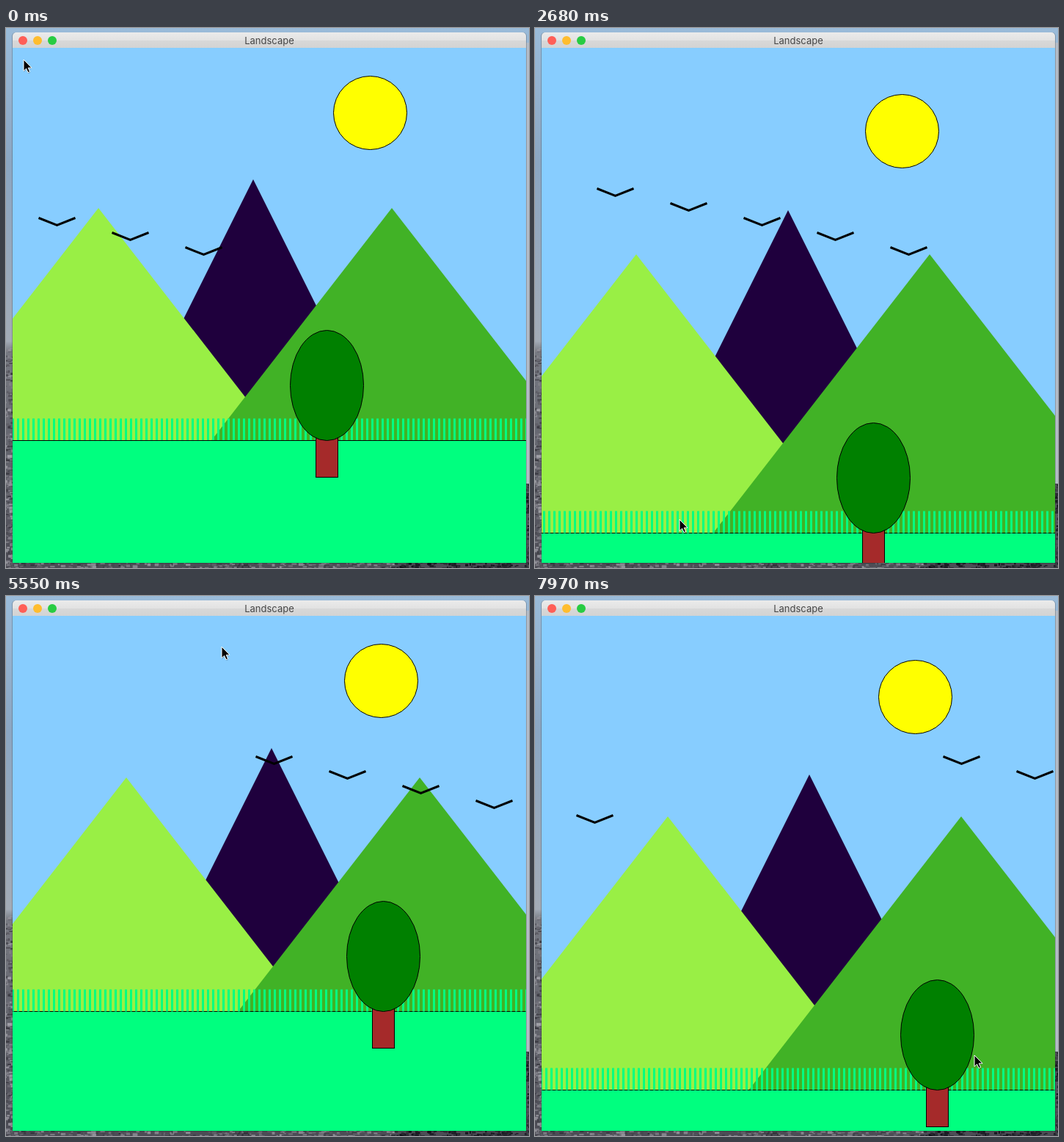
These frames come from a looping animation (713x735 px, 8 s). An HTML page:

```html
<!DOCTYPE html>
<html lang="en">
<head>
<meta charset="utf-8">
<title>Landscape</title>
<style>
  html, body { margin: 0; width: 100%; height: 100%; overflow: hidden; background: #9fbbd3; }
  svg { display: block; width: 100%; height: 100%; }
  .title { font: 13px Inter, "Liberation Sans", sans-serif; fill: #454545; text-anchor: middle; }
  .ink { stroke: #000; stroke-width: 1; }
</style>
</head>
<body>
<svg viewBox="0 0 713 735">
  <defs>
    <linearGradient id="air" x1="0" y1="0" x2="0" y2="1">
      <stop offset="0" stop-color="#9abbd9"/>
      <stop offset=".25" stop-color="#8ba6c2"/>
      <stop offset=".58" stop-color="#a3abb6"/>
      <stop offset=".6" stop-color="#777a82"/>
      <stop offset="1" stop-color="#4c4c55"/>
    </linearGradient>
    <linearGradient id="bar" x1="0" y1="0" x2="0" y2="1">
      <stop offset="0" stop-color="#ebebeb"/>
      <stop offset=".5" stop-color="#e2e2e2"/>
      <stop offset=".52" stop-color="#d8d8d8"/>
      <stop offset="1" stop-color="#d3d3d3"/>
    </linearGradient>
    <clipPath id="view"><rect x="9" y="27" width="700" height="701"/></clipPath>
  </defs>

  <rect width="713" height="735" fill="url(#air)"/>
  <rect x="709" y="20" width="4" height="600" fill="#b3bcc8"/>
  <g id="rock"></g>
  <rect x="8" y="6" width="702" height="723" rx="5" fill="#000" opacity=".2"/>
  <path d="M9 27V11a5 5 0 0 1 5-5H704a5 5 0 0 1 5 5V27Z" fill="url(#bar)"/>
  <circle cx="23" cy="17" r="6" fill="#ff5f57"/>
  <circle cx="43" cy="17" r="6" fill="#ffbd2e"/>
  <circle cx="63" cy="17" r="6" fill="#28cc42"/>
  <text class="title" x="359" y="22">Landscape</text>

  <g clip-path="url(#view)">
    <rect x="9" y="27" width="700" height="701" fill="#87cdff"/>
    <circle id="sun" class="ink" cx="496.5" cy="115.5" r="50" fill="#ff0"/>
    <path id="peak" d="M337 206l225 450h-450Z" fill="#1f003d"/>
    <g id="hills">
      <path d="M126 245l350 450h-700Z" fill="#99ef45"/>
      <path d="M526 245l350 450h-700Z" fill="#41b226"/>
    </g>
    <rect id="ground" class="ink" x="-10" y="561.5" width="740" height="300" fill="#00ff7f"/>
    <path id="grass" stroke="#00ff7f" stroke-width="3"/>
    <g id="tree" class="ink">
      <rect x="422.5" y="541.5" width="30" height="70" fill="#a52a2a"/>
      <ellipse cx="437.5" cy="486.5" rx="50" ry="75" fill="#008000"/>
    </g>
    <g id="birds" fill="none" stroke="#000" stroke-width="3"></g>
  </g>

  <g id="cursor">
    <path d="M0 1V17L4 13.5L6.5 19L9 18L6.5 12.5H11Z" fill="#000" opacity=".25"/>
    <path d="M0 0V15.5L3.6 12.2L6 17.6L8.6 16.5L6.2 11.2H11Z" fill="#000" stroke="#fff" stroke-width="1"/>
  </g>
</svg>
<script>
const LOOP = 8000, LEAD = 110, START = 1000;
const $ = id => document.getElementById(id);

// pointer path inside the window: time, x, y
const path = [
  [START, 15, 15], [1330, 21, 242], [1440, 48, 365], [1690, 78, 482],
  [2100, 98, 570], [2500, 112, 618], [2680, 122, 631], [2790, 188, 641],
  [3310, 430, 622], [3750, 540, 520], [4200, 592, 351], [4650, 632, 156],
  [4760, 652, 114], [5010, 665, 32], [5250, 610, 26], [5550, 387, 24],
  [5660, 285, 41], [5900, 110, 34], [6200, 36, 32], [6500, 26, 32],
  [6740, 38, 34], [7170, 106, 131], [7280, 163, 214], [7440, 260, 388],
  [7700, 410, 480], [7970, 557, 556], [8080, 590, 597]
];

function slope(i, c) {
  if (i === 0 || i === path.length - 1) return 0;
  const a = path[i - 1], b = path[i + 1];
  return (b[c] - a[c]) / (b[0] - a[0]);
}

// cubic Hermite interpolation along the path
function pointer(t) {
  const last = path.length - 1;
  t = Math.min(Math.max(t, path[0][0]), path[last][0]);
  let i = 0;
  while (i < last - 1 && t >= path[i + 1][0]) i++;
  const a = path[i], b = path[i + 1], h = b[0] - a[0], u = (t - a[0]) / h;
  const u2 = u * u, u3 = u2 * u;
  return [1, 2].map(c =>
    (2 * u3 - 3 * u2 + 1) * a[c] + (u3 - 2 * u2 + u) * h * slope(i, c) +
    (3 * u2 - 2 * u3) * b[c] + (u3 - u2) * h * slope(i + 1, c));
}

// steps last 90 ms, a few only 80
const stepTime = k => 90 * k - 10 * [10, 11, 43, 87].filter(n => k >= n).length;
function stepAt(t) {
  let k = 0;
  while (k < 89 && stepTime(k + 1) <= t) k++;
  return k;
}

const move = (el, x, y) => el.setAttribute("transform", `translate(${x} ${y})`);

function add(parent, tag, attrs) {
  const el = document.createElementNS("http://www.w3.org/2000/svg", tag);
  for (const key in attrs) el.setAttribute(key, attrs[key]);
  return parent.appendChild(el);
}

let seed = 7;
const random = () => (seed = (seed * 16807) % 2147483647) / 2147483647;

function speckle(count, x, y, w, h, dark, light) {
  for (let i = 0; i < count; i++) {
    const v = Math.round(dark + random() * (light - dark));
    add($("rock"), "rect", {
      x: x + random() * w, y: y + random() * h,
      width: 2 + random() * 5, height: 1 + random() * 3,
      fill: `rgb(${v},${v},${v + 8})`
    });
  }
}
speckle(240, -3, 436, 11, 298, 60, 160);
speckle(260, 0, 727, 530, 8, 50, 145);
speckle(110, 525, 727, 190, 8, 15, 60);
speckle(60, 709, 620, 4, 112, 15, 75);

const birds = Array.from({ length: 5 }, () => add($("birds"), "path", { d: "M0 0l25 10l25-10" }));

function draw(t) {
  const k = stepAt(t), now = stepTime(k);
  const [mx, my] = now < START ? [0, 0] : pointer(now).map(Math.floor);
  const shift = (el, d) => move(el, Math.floor(mx / d), Math.floor(my / d));

  shift($("sun"), 25);
  shift($("peak"), 15);
  shift($("hills"), 10);
  shift($("tree"), 5);

  const dy = Math.floor(my / 5);
  move($("ground"), 0, dy);
  const foot = my % 5 ? 561.5 : 561;
  let d = "";
  for (let x = 2.5; x < 720; x += 7) d += `M${x} 531.5V${foot}`;
  $("grass").setAttribute("d", d);
  move($("grass"), Math.floor(mx / 5) % 7, dy);

  birds.forEach((bird, i) =>
    move(bird, (1244 - 100 * i + 8 * k) % 900 - 99.5 + (0), 298.5 - 20 * i));

  const [cx, cy] = pointer(now + LEAD);
  move($("cursor"), Math.round(cx) + 9, Math.round(cy) + 28);
}

// birds wrap every 900 px, entering 100 px left of the window
birds.forEach((bird, i) => bird.setAttribute("data-row", i));

const begin = performance.now();
function tick() {
  draw((performance.now() - begin) % LOOP);
  requestAnimationFrame(tick);
}
draw(0);
requestAnimationFrame(tick);
</script>
</body>
</html>
```
